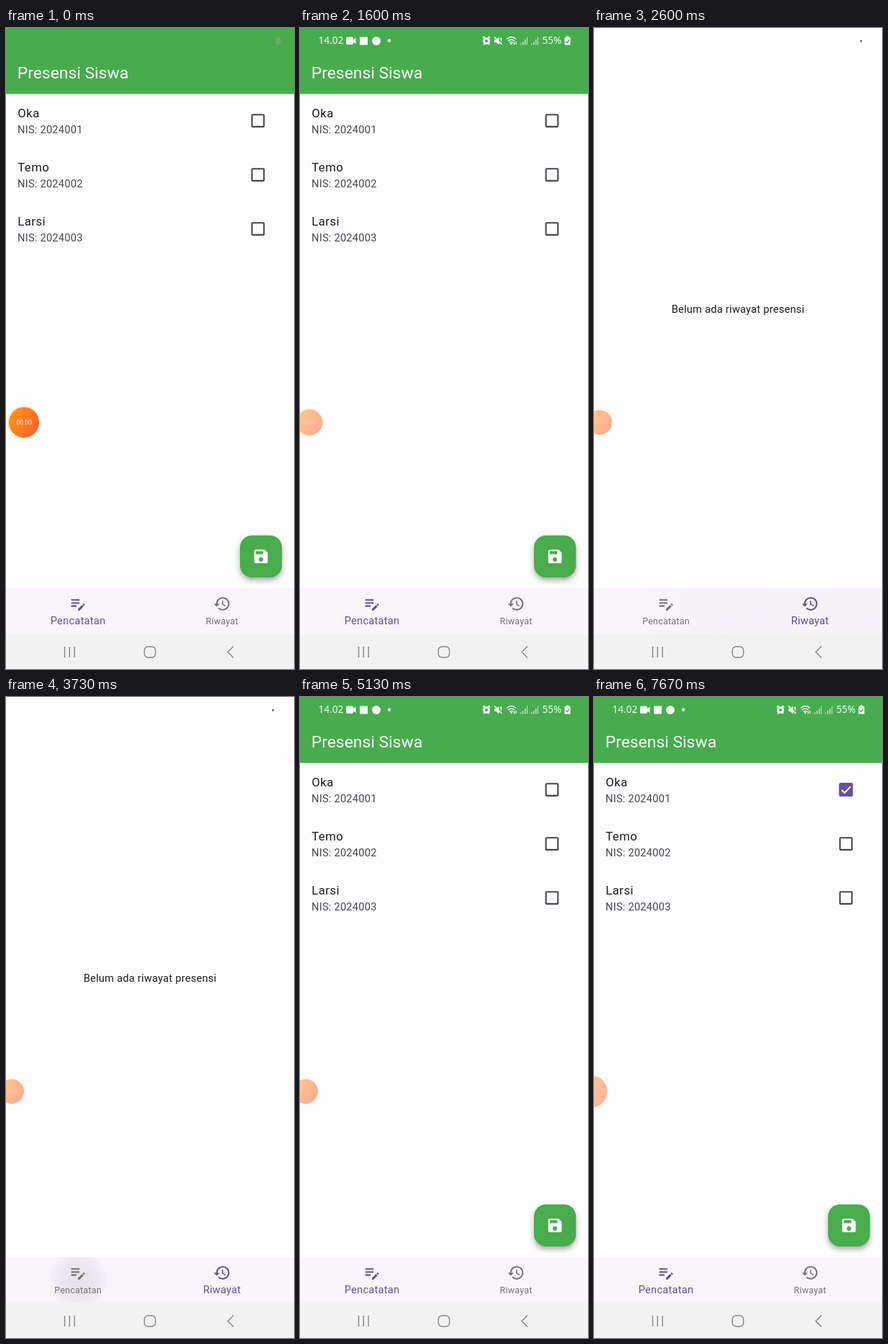
Animation of 400 by 889 pixels, one loop 8 s. Source, as an HTML page:

```html
<!DOCTYPE html>
<html lang="id">
<head>
<meta charset="utf-8">
<title>Presensi Siswa</title>
<style>
  html, body { margin: 0; width: 100%; height: 100%; overflow: hidden; background: #fdfdfd; }
  svg { display: block; width: 100%; height: 100%; font-family: Roboto, sans-serif; }
  .status text { font-family: "Noto Sans", sans-serif; font-size: 13.6px; }
  .name { font-size: 16.67px; letter-spacing: .52px; fill: #1d1b20; }
  .sub { font-size: 14.58px; letter-spacing: .26px; fill: #49454f; }
  .label { font-size: 14.58px; letter-spacing: .26px; text-anchor: middle; }
</style>
</head>
<body>
<svg viewBox="0 0 400 889" preserveAspectRatio="none">
  <defs>
    <linearGradient id="orange" x1="0" y1="0" x2="1" y2=".6">
      <stop offset="0" stop-color="#ff9a1c"/><stop offset="1" stop-color="#ff6428"/>
    </linearGradient>
    <linearGradient id="peach" x1="0" y1="0" x2="1" y2=".6">
      <stop offset="0" stop-color="#ffcb8e"/><stop offset="1" stop-color="#ffae90"/>
    </linearGradient>
    <radialGradient id="halo">
      <stop offset=".8" stop-color="#ffcf9c" stop-opacity=".6"/>
      <stop offset="1" stop-color="#ffe6cc" stop-opacity=".1"/>
    </radialGradient>
    <radialGradient id="wave">
      <stop offset="0" stop-color="#e7e2ea"/>
      <stop offset=".55" stop-color="#ebe6ef"/>
      <stop offset="1" stop-color="#ebe6ef" stop-opacity=".25"/>
    </radialGradient>
    <filter id="shadow" x="-30%" y="-30%" width="160%" height="170%">
      <feDropShadow dx="0" dy="4" stdDeviation="3.5" flood-color="#333" flood-opacity=".4"/>
    </filter>
    <clipPath id="navClip"><rect y="777" width="400" height="63"/></clipPath>
  </defs>

  <rect width="400" height="889" fill="#fdfdfd"/>

  <g id="list">
    <rect width="400" height="91.500" fill="#48ac4e"/>
    <rect id="ghost" x="374.500" y="13" width="7" height="10" rx="2" fill="#6cae6c"/>
    <g id="status" class="status" fill="#f6fbf6">
      <text x="25.500" y="22">14.02</text>
      <path d="M66 12.500h6a2 2 0 0 1 2 2v1.500l3.500-2.500v8.500l-3.500-2.500v1.500a2 2 0 0 1-2 2h-6a2 2 0 0 1-2-2v-6.500a2 2 0 0 1 2-2z"/>
      <rect x="83" y="12.500" width="11" height="11"/>
      <circle cx="106" cy="18" r="6"/>
      <circle cx="124" cy="17.500" r="2.200"/>
      <g fill="none" stroke="#f6fbf6">
        <circle cx="259" cy="18" r="3.500" stroke-width="3"/>
        <path d="M254 14l2.500-2M264 14l-2.500-2M255 23l1.500-1.500M263 23l-1.500-1.500" stroke-width="1.800"/>
        <path d="M270 12.500l10.500 10.500" stroke-width="1.600"/>
        <path d="M287 15.500q6.500-6 13 0M289 18q4.500-4 9 0M291 20.500q2.500-2.200 5 0" stroke-width="1.300"/>
        <path d="M297.500 23.500v-4M300 18.500v4.500" stroke-width="1.200"/>
      </g>
      <path d="M270 16h2.500l4-3.500v11l-4-3.500h-2.500zM278 14.500l2-1.500v8z"/>
      <circle cx="293.500" cy="22" r="1.300"/>
      <path id="bars" d="M306 23.500v-2h1.500v2zM309 23.500v-4.500h1.500v4.500zM312 23.500v-7.500h1.500v7.500zM315 23.500v-11h1v11z" opacity=".7"/>
      <use href="#bars" x="15"/>
      <text x="336.500" y="22">55%</text>
      <path d="M369.500 11.500h4v1.500h2v10.500h-8v-10.500h2z"/>
      <path d="M369 18.500l2 2 3-4" fill="none" stroke="#48ac4e" stroke-width="1.300"/>
    </g>
    <text x="15.700" y="69.600" font-size="22.900" fill="#fff">Presensi Siswa</text>
    <g id="rows"></g>
    <g id="tick">
      <rect x="340.600" y="119.200" width="18.800" height="18.800" rx="1.500" fill="#65509c"/>
      <path d="M344 129l4 4 8.200-8.600" fill="none" stroke="#fff" stroke-width="2.100"/>
    </g>
    <rect x="325" y="703.700" width="58.300" height="58.300" rx="16.700" fill="#48ac4e" filter="url(#shadow)"/>
    <path transform="translate(341.600 720.400) scale(1.0417)" fill="#fff" d="M17 3H5c-1.110 0-2 .9-2 2v14c0 1.100.890 2 2 2h14c1.100 0 2-.9 2-2V7l-4-4zm-5 16c-1.660 0-3-1.340-3-3s1.340-3 3-3 3 1.340 3 3-1.340 3-3 3zm3-10H5V5h10v4z"/>
  </g>

  <g id="empty">
    <text class="label" x="200" y="394.500" fill="#1d1b20">Belum ada riwayat presensi</text>
    <path d="M369.500 17h3l-2 3.500z" fill="#4a4a4a"/>
  </g>

  <rect y="777" width="400" height="63" fill="#f9f5fb"/>
  <g clip-path="url(#navClip)"><circle id="ripple" cy="808" fill="url(#wave)"/></g>
  <g id="tabs"></g>

  <rect y="840" width="400" height="49" fill="#f2f2f2"/>
  <g fill="none" stroke="#858585" stroke-width="1.400">
    <path d="M81.500 858v15M88.300 858v15M95.100 858v15"/>
    <rect x="192.200" y="858" width="15.400" height="15" rx="5"/>
    <path d="M316 857.500l-8 8 8 8"/>
  </g>

  <g id="timer">
    <circle id="glow" r="25" fill="url(#halo)"/>
    <circle r="21" fill="url(#peach)"/>
    <circle id="bright" r="21" fill="url(#orange)"/>
    <text id="clock" y="3" font-size="8.600" text-anchor="middle" fill="#ffeede"></text>
  </g>
</svg>

<script>
const $ = id => document.getElementById(id);
const LOOP = 8000, TO_HISTORY = 2330, TO_LIST = 3800;
const TICKS = [1070, 2200, 3270, 4270, 4800];

const clamp = v => Math.min(1, Math.max(0, v));
const span = (t, a, b) => clamp((t - a) / (b - a));
const mix = (a, b, k) => a + (b - a) * k;
const easeOut = k => 1 - Math.pow(1 - k, 1.75);
const smooth = k => k * k * (3 - 2 * k);
const show = (id, on) => $(id).style.display = on ? '' : 'none';
const set = (el, attrs) => { for (const k in attrs) el.setAttribute(k, attrs[k]); };

$('rows').innerHTML = ['Oka', 'Temo', 'Larsi'].map((name, i) => `
  <g transform="translate(0 ${i * 75})">
    <text class="name" x="16.2" y="123.700">${name}</text>
    <text class="sub" x="16" y="146.300">NIS: 202400${i + 1}</text>
    <rect x="341.600" y="120.200" width="16.700" height="16.700" rx="1" fill="none" stroke="#49454f" stroke-width="2.100"/>
  </g>`).join('');

const tabs = [
  { x: 100, label: 'Pencatatan', icon: 'M3 10h11v2H3v-2zm0-2h11V6H3v2zm0 8h7v-2H3v2zm15.010-3.130.710-.710c.390-.390 1.020-.390 1.410 0l.710.710c.390.390.390 1.020 0 1.410l-.710.710-2.120-2.120zm-.710.710-5.300 5.300V21h2.120l5.300-5.300-2.120-2.120z' },
  { x: 300, label: 'Riwayat', icon: 'M13 3a9 9 0 0 0-9 9H1l3.890 3.890.070.140L9 12H6c0-3.870 3.130-7 7-7s7 3.130 7 7-3.130 7-7 7c-1.930 0-3.680-.790-4.940-2.060l-1.420 1.420A8.950 8.950 0 0 0 13 21a9 9 0 0 0 0-18zm-1 5v5l4.280 2.540.720-1.210-3.500-2.080V8H12z' }
];
$('tabs').innerHTML = tabs.map(t => `
  <g>
    <path transform="translate(${t.x - 12.5} 786) scale(1.0417)" d="${t.icon}"/>
    <text class="label" y="-3.500">${t.label}</text>
  </g>`).join('');

// The label grows from its bottom centre as the tab becomes selected.
function drawTab(i, k) {
  const g = $('tabs').children[i], s = mix(12 / 14, 1, k);
  const rgb = [[116, 98], [114, 80], [118, 156]].map(([a, b]) => Math.round(mix(a, b, k)));
  g.setAttribute('fill', `rgb(${rgb})`);
  g.lastElementChild.setAttribute('transform', `translate(${tabs[i].x} 830.300) scale(${s})`);
}

function drawRipple(t) {
  const first = t < 3000;
  const age = t - (first ? 2365 : 3695);
  const fade = first ? span(t, 2470, 2620) : span(t, 4010, 4280);
  set($('ripple'), {
    cx: first ? 300 : 100,
    r: age < 0 ? 0 : 6 + age * .95,
    opacity: 1 - fade
  });
}

function drawTimer(t) {
  const dock = easeOut(span(t, 1330, 1870));
  const tuck = smooth(span(t, 5130, 5670));
  const x = mix(mix(25, 8, dock), -3.5, tuck);
  const r = mix(mix(21, 17, dock), 22, tuck);
  $('timer').setAttribute('transform', `translate(${x} 547) scale(${r / 21})`);
  $('bright').setAttribute('opacity', 1 - clamp(dock * 1.4));
  $('glow').setAttribute('opacity', mix(1, .5, dock));
  $('timer').setAttribute('opacity', mix(1, .9, tuck));
  $('clock').setAttribute('opacity', mix(1, .2, dock) * (1 - tuck));
  $('clock').textContent = '00.0' + TICKS.filter(s => t >= s).length;
}

function draw(t) {
  const history = t >= TO_HISTORY && t < TO_LIST;
  show('list', !history);
  show('empty', history);

  const bar = span(t, 30, 330);
  $('status').setAttribute('opacity', bar);
  $('ghost').setAttribute('opacity', 1 - bar);

  const k = smooth(span(t, TO_HISTORY, TO_HISTORY + 200)) - smooth(span(t, TO_LIST, TO_LIST + 200));
  drawTab(0, 1 - k);
  drawTab(1, k);
  drawRipple(t);
  drawTimer(t);
  $('tick').setAttribute('opacity', span(t, 7560, 7665));
}

const start = performance.now();
function loop() {
  draw((performance.now() - start) % LOOP);
  requestAnimationFrame(loop);
}
draw(0);
requestAnimationFrame(loop);
</script>
</body>
</html>
```
